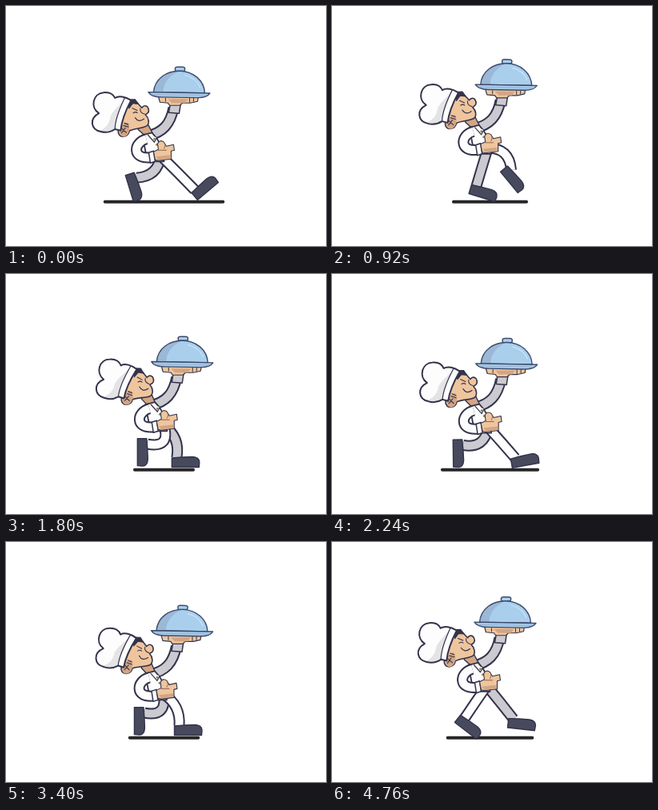
An HTML page with a canvas that plays this animation: 400x300 px, repeating every 4.8 s.

```html
<!DOCTYPE html>
<html lang="en">
<head>
<meta charset="utf-8">
<title>Walking chef</title>
<style>
  html, body { margin: 0; width: 100%; height: 100%; overflow: hidden; background: #fff; }
  canvas { display: block; width: 400px; height: 300px; }
</style>
</head>
<body>
<canvas id="stage" width="400" height="300"></canvas>
<script>
const ctx = document.getElementById('stage').getContext('2d');
const { PI, sin, cos, max, hypot, sqrt } = Math;
const LOOP = 4800, STEP = 40, STRIDE = 27; // STRIDE counts steps of STEP ms
const LEG_LENGTH = 47;
const INK = '#33334b', SHOE = '#474a5d', WHITE = '#fdfdfd', GREY = '#cbcad0';
const SKIN = '#efc59d', TAN = '#d3a583', SHADE = '#e4e4e6';
const STEEL = '#a9cfed', STEEL_DARK = '#9bb8d6', STEEL_INK = '#3c4a6b';

function ease(from, to, t) {
  const u = Math.min(1, max(0, (t - from) / (to - from)));
  return u * u * (3 - 2 * u);
}

function shape(d, fill, width = 1.8, ink = INK) {
  const path = new Path2D(d);
  if (fill) { ctx.fillStyle = fill; ctx.fill(path); }
  if (width) { ctx.strokeStyle = ink; ctx.lineWidth = width; ctx.stroke(path); }
}

function tube(d, fill, width) {
  ctx.lineCap = 'butt';
  shape(d, null, width);
  shape(d, null, width - 4, fill);
  ctx.lineCap = 'round';
}

function turned(x, y, angle, paint, pivotX = 0, pivotY = 0) {
  ctx.save();
  ctx.translate(x, y);
  ctx.rotate(angle * PI / 180);
  ctx.translate(-pivotX, -pivotY);
  paint();
  ctx.restore();
}

// The heel lands at 0, the foot rolls off the ground and then swings forward.
function footAt(n) {
  const turn = 2 * PI * n / STRIDE;
  const angle = -40 * (1 - ease(0, 3, n)) + 90 * ease(7, 16, n) - 90 * ease(20, STRIDE, n)
    - 40 * ease(22, STRIDE, n);
  const roll = 16 * sin(max(0, angle) * PI / 180);
  const swing = n > 17 ? 14 * sin(PI * (n - 17) / 10) ** 2 : 0;
  return {
    x: 197 + 36.5 * cos(turn) - 2.5 * sin(2 * turn),
    y: 229 - roll - swing,
    angle
  };
}

// A hose of fixed length: the closer the foot, the more the knee bends forward.
function leg(phase, hipX, hipY, sway, fill) {
  const foot = footAt(phase % STRIDE);
  const x = foot.x + sway, dx = x - hipX, dy = foot.y - hipY, reach = hypot(dx, dy);
  const bend = 0.72 * sqrt(max(0, LEG_LENGTH ** 2 - reach ** 2)) / reach;
  const kneeX = hipX + dx / 2 + bend * dy, kneeY = hipY + dy / 2 - bend * dx;
  tube(`M${hipX} ${hipY}Q${kneeX} ${kneeY} ${x} ${foot.y + 1}`, fill, 14);
  turned(x, foot.y, foot.angle, () =>
    shape('M-6 1L7 0 20 -.5Q28 0 28.5 6L28 12.5H-6Z', SHOE, 1.4));
}

function head() {
  shape('M170 138L181 143 186 154 176 156 168 148Z', TAN, 1.4);
  shape('M157 112L169 115 174 121Q177 117 181 120Q184 125 181 128L178 130' +
    'C182 134 183 141 179 144C173 147 164 146 157 149C155 157 145 158 143 151L143 142Z', SKIN, 1.6);
  shape('M145 143L155 138C159 144 157 155 150 156C145 156 143 151 145 143Z', TAN, 0);
  shape('M157 110L166 110 170 116 163 115 158 121Z', INK, 1);
  shape('M162 121L168 124M163 127Q166 125 168 127M172 122Q171 127 177 129', null, 1.1);
  shape('M165 133Q169 140 176 135', null, 1.2);
  shape('M147 145L153 151M147 151L152 145M151 139L156 141M150 142L156 144', null, 1.1);

  const hat = 'M146 148L139 146C134 149 127 150 121 148C109 145 107 131 120 125' +
    'C109 117 114 100 127 99.5C134 99 139 102 141 107C146 104 154 106 161 111C155 121 148 135 146 148Z';
  shape(hat, WHITE, 0);
  shape('M139 146C132 149 126 149 120 147C130 143 133 136 134 130C138 122 146 117 153 109' +
    'C147 120 141 132 139 146Z', SHADE, 0);
  shape(hat, null, 2);
  shape('M153 108C147 119 140 133 139 146', null, 1.2);
}

function tray() {
  shape('M193 107H243L242 113 233 115H223L220 118H207L205 115 195 114Z', SKIN, 1.2);
  shape('M205 110H230L226 115H210Z', TAN, 0);
  shape('M202 109V113M232 109V114M237 109V113', null, 1);
  turned(219, 103, 1, () => {
    shape('M214 75Q212 70 216 70H223Q227 70 225 75Z', STEEL, 1.5, STEEL_INK);
    const dome = 'M187 102C188 85 203 75 219 75C236 75 250 86 251 102Z';
    shape(dome, STEEL, 0);
    shape('M187 102C188 85 203 75 218 75C205 82 199 91 199 102Z', STEEL_DARK, 0);
    shape(dome, null, 1.4, STEEL_INK);
    shape('M226 80Q241 84 245 95', null, 1, '#d5e9f8');
    shape('M180.5 102H257.5Q254 108 242 108H197Q184 108 180.5 102Z', STEEL, 1.4, STEEL_INK);
    shape('M186 105H252', null, 1.5, STEEL_DARK);
  }, 219, 103);
}

function torso() {
  shape('M173 155L185 152C193 160 198 168 200 188H186L177 176Z', WHITE);
  shape('M180 155L188 164 191 158', WHITE, 1.2);
  shape('M188 160h.1M191 167h.1', null, 3, '#8f8a58');
  tube('M178 160C162 164 159 186 184 183', WHITE, 14);
  shape('M181 177L187 175 189 188 183 190Z', WHITE, 1.5);
  shape('M187 176L193 173 192 166Q195 160 200 164L203 169 212 167 213 174 209 175V185L193 187 189 186Z',
    SKIN, 1.1);
  shape('M190 182L208 180V184L193 186Z', TAN, 0);
  shape('M193 174H203M200 164Q203 168 200 172', null, 1, '#8a6656');
}

function draw(frame) {
  const n = frame % STRIDE;
  const turn = 2 * PI * n / STRIDE, bob = 2 * turn;
  const x = -0.7 + 2.2 * sin(bob - 1), y = 3.8 + 7 * sin(bob + 0.36);
  const tilt = -1 + 2.8 * sin(bob - 0.8);
  const sway = 3 * cos(turn + 0.6);
  const shadow = 37 + 33 * ((1 + cos(bob + 0.12)) / 2) ** 1.9 + 4 * cos(turn);
  const hipX = 196 + x, hipY = 181 + y;

  ctx.fillStyle = '#fff';
  ctx.fillRect(0, 0, 400, 300);
  ctx.lineCap = ctx.lineJoin = 'round';
  shape(`M${197.5 - shadow} 244.7h${2 * shadow}`, null, 4, '#262628');

  leg(n + STRIDE / 2, hipX, hipY, sway, GREY);
  leg(n, hipX, hipY, sway, WHITE);
  turned(x, y, 0, () => {
    tube('M180 156C198 152 208 142 212 121', GREY, 14);
    shape('M208 115L221 115 219 128 206 127Z', GREY, 1.5);
    turned(172, 152, tilt, head, 172, 152);
    torso();
    tray();
  });
}

function tick() {
  draw(Math.floor((performance.now() % LOOP) / STEP));
  requestAnimationFrame(tick);
}
tick();
</script>
</body>
</html>
```
